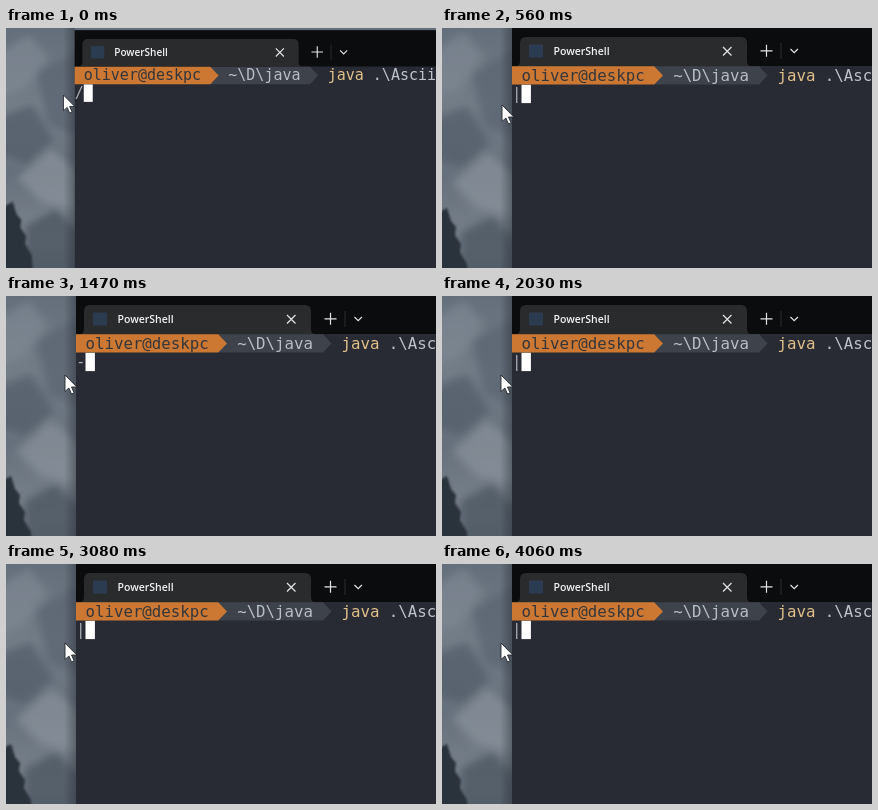
An HTML page that plays this animation: 430x240 px, repeating every 4200 ms.

```html
<!DOCTYPE html>
<html lang="en">
<head>
<meta charset="utf-8">
<title>Terminal spinner</title>
<style>
  html, body { margin: 0; width: 100%; height: 100%; overflow: hidden; background: #282b33; }
  svg { display: block; width: 100vw; height: 100vh; }
  .mono { font: 15.75px "DejaVu Sans Mono", monospace; white-space: pre; }
  .title { font: 600 10.5px "Open Sans", "Noto Sans", sans-serif; fill: #f4f4f4; }
  .icon { fill: none; stroke: #e4e4e4; stroke-width: 1.2; }
</style>
</head>
<body>
<svg viewBox="0 0 430 240" preserveAspectRatio="none">
  <defs>
    <linearGradient id="sky" x2="0" y2="1">
      <stop offset="0" stop-color="#626d79"/>
      <stop offset=".3" stop-color="#737d88"/>
      <stop offset=".55" stop-color="#66707c"/>
      <stop offset=".8" stop-color="#7b848e"/>
      <stop offset="1" stop-color="#59636f"/>
    </linearGradient>
    <linearGradient id="shade">
      <stop offset="0" stop-color="#20252c" stop-opacity="0"/>
      <stop offset="1" stop-color="#20252c" stop-opacity=".4"/>
    </linearGradient>
    <filter id="soft" x="-50%" y="-50%" width="200%" height="200%"><feGaussianBlur stdDeviation="4"/></filter>
    <filter id="edge"><feGaussianBlur stdDeviation="1"/></filter>
  </defs>

  <g id="camera">
    <g id="wallpaper">
      <rect x="-10" y="-10" width="480" height="290" fill="url(#sky)"/>
      <g filter="url(#soft)">
        <path d="M-10 25 L22 5 L42 28 L18 62 L-10 70Z" fill="#828b95" opacity=".65"/>
        <path d="M30 45 L75 20 V112 L42 98Z" fill="#59636f" opacity=".7"/>
        <path d="M-10 92 L25 78 L48 115 L20 140 L-10 130Z" fill="#525d69" opacity=".7"/>
        <path d="M10 155 L45 125 L75 148 V190 L35 180Z" fill="#929aa2" opacity=".6"/>
        <path d="M18 205 L50 188 L75 212 V260 H18Z" fill="#4a5561" opacity=".75"/>
      </g>
      <path d="M-10 188 L5 180 L9 193 L14 199 L13 207 L19 216 L18 224 L25 236 L27 270 H-10Z"
            fill="#29323a" filter="url(#edge)"/>
      <rect x="58" y="-10" width="12" height="290" fill="url(#shade)"/>
    </g>

    <rect x="70" width="400" height="280" fill="#282b33"/>
    <rect x="70" width="400" height="38" fill="#0b0c0d"/>
    <path d="M74 38 Q78 38 78 33 V15 Q78 9 84 9 H299 Q305 9 305 15 V33 Q305 38 309 38Z" fill="#2a2b2d"/>
    <rect x="87" y="16.5" width="14" height="13" fill="#2c3c50"/>
    <text class="title" x="111.5" y="27">PowerShell</text>
    <path class="icon" d="M281 19 l8.5 8.5 m0 -8.5 l-8.5 8.5"/>
    <path class="icon" d="M318.5 22.8 h12 m-6 -6 v12" stroke-width="1.4"/>
    <path class="icon" d="M348.5 21 l3.7 3.7 l3.7 -3.7"/>
    <path d="M339 15 v16" stroke="#2b2c2e"/>

    <path d="M212 38.3 H317 L325.5 47.4 L317 56.5 H212Z" fill="#3e424b"/>
    <path d="M70 38.3 H212.2 L221 47.4 L212.2 56.5 H70Z" fill="#cc7832"/>
    <g id="line" class="mono"></g>
    <text id="spinner" class="mono" x="70" y="70.8" fill="#a7abb2"></text>
    <rect x="79.5" y="56.8" width="9.4" height="18.3" fill="#fff"/>

    <path id="pointer" d="M0 0 V16.5 L3.9 13 L6.5 19 L9.1 17.9 L6.5 12 H11.8Z"
          fill="#fff" stroke="#24272c" stroke-width=".9" stroke-linejoin="round"/>
  </g>
</svg>
<script>
const LOOP = 4200, STEP = 70, LAST_STEP = 58;
const CELL = 9.48, LEFT = 70, BASELINE = 52.5;
const SPIN = "/-\\||";

const byId = id => document.getElementById(id);
const camera = byId("camera"), spinner = byId("spinner"), pointer = byId("pointer");

function write(column, text, color) {
  const el = document.createElementNS("http://www.w3.org/2000/svg", "text");
  el.setAttribute("x", LEFT + column * CELL);
  el.setAttribute("y", BASELINE);
  el.setAttribute("fill", color);
  el.textContent = text;
  byId("line").append(el);
}
write(1, "oliver@deskpc", "#34363b");
write(17, "~\\D\\java", "#b9bec7");
write(28, "java", "#e2c08a");
write(33, ".\\AsciiSpinner", "#bdc2ca");

const lerp = (a, b, k) => a + (b - a) * k;
const easeOut = (t, start, end) => {
  const k = Math.min(1, Math.max(0, (t - start) / (end - start)));
  return 1 - (1 - k) ** 3;
};

function render(now) {
  const step = Math.min(LAST_STEP, Math.floor((now % LOOP) / STEP));
  const t = step * STEP;

  const zoom = easeOut(t, 0, 560);
  camera.setAttribute("transform",
    `translate(${lerp(2, 0, zoom)} ${lerp(2.3, 0, zoom)}) scale(${lerp(0.953, 1, zoom)})`);

  const settle = easeOut(t, 560, 770);
  const x = lerp(lerp(58.2, 60, zoom), 59, settle);
  const y = lerp(lerp(67.9, 77, zoom), 79, settle);
  pointer.setAttribute("transform", `translate(${x} ${y})`);

  spinner.textContent = SPIN[step % SPIN.length];
}

const start = performance.now();
function tick() {
  render(performance.now() - start);
  requestAnimationFrame(tick);
}
tick();
</script>
</body>
</html>
```
